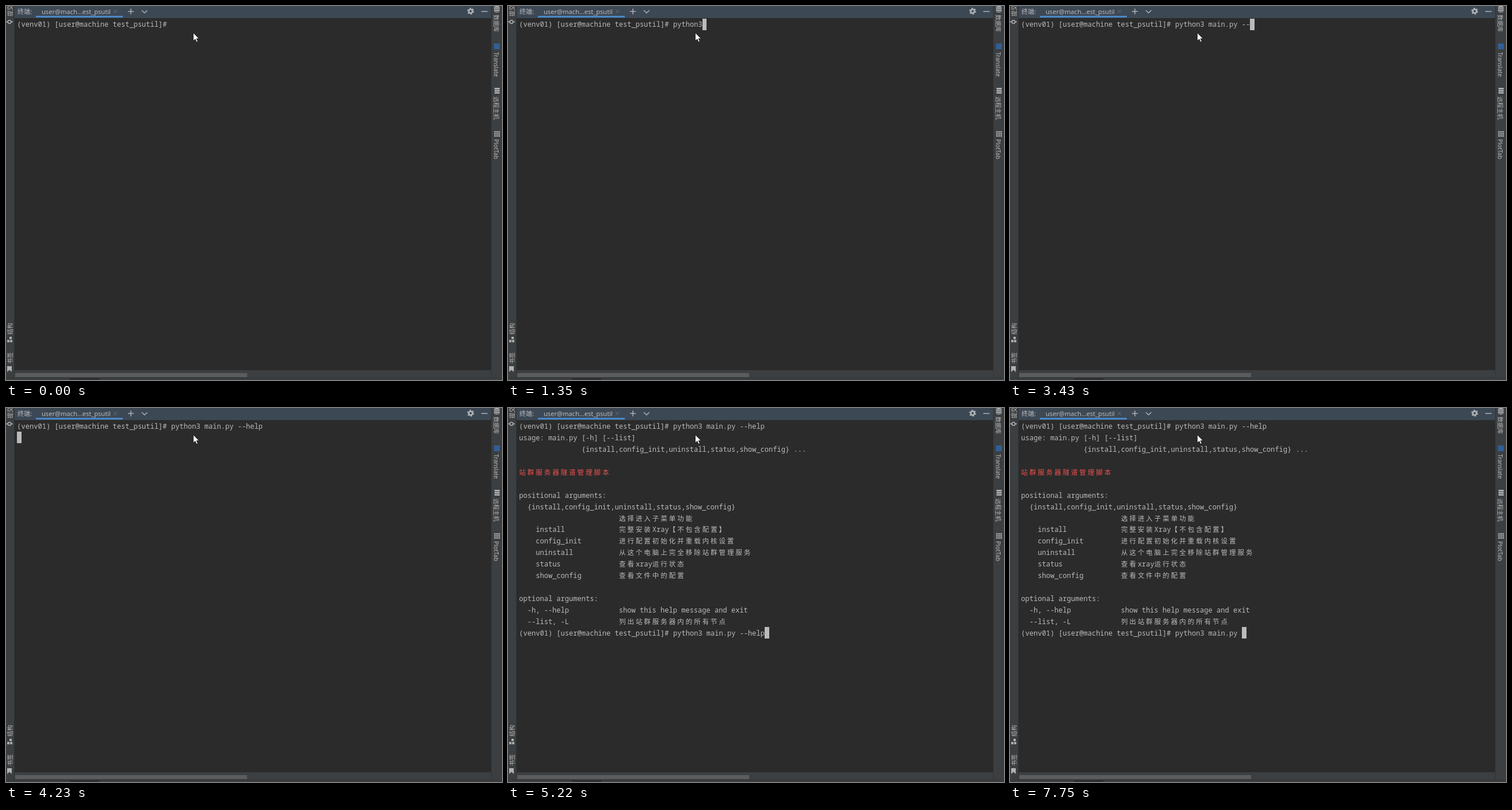
An HTML page that plays this animation: 862x649 px, repeating every 8 s.

```html
<!DOCTYPE html>
<html lang="zh-CN">
<head>
<meta charset="utf-8">
<title>Terminal</title>
<style>
  html, body { margin: 0; width: 100%; height: 100%; overflow: hidden; background: #2b2b2b; }
  svg { display: block; width: 862px; height: 649px; }
  text { fill: #bbb; white-space: pre; }
  .ui { font: 11.1px "Noto Sans", "Noto Sans CJK SC", "Noto Sans CJK", sans-serif; }
  .side { font: 10px "Noto Sans", "Noto Sans CJK SC", "Noto Sans CJK", sans-serif; dominant-baseline: central; }
  .mono { font: 12.06px "Noto Sans Mono", "DejaVu Sans Mono", monospace; font-variant-ligatures: none; }
  .cjk { font: 11.5px "Noto Sans CJK SC", "Noto Sans CJK", sans-serif; letter-spacing: 2.97px; }
  .red text { fill: #f0524f; }
  .line { fill: none; stroke: #afb1b3; stroke-width: 1.5; }
  .solid { fill: #afb1b3; }
  rect { shape-rendering: crispEdges; }
</style>
</head>
<body>
<svg viewBox="0 0 862 649" xmlns="http://www.w3.org/2000/svg">
  <rect width="862" height="649" fill="#3c3f41"/>
  <rect x="15" width="828" height="632" fill="#2b2b2b"/>
  <rect x="15" width="828" height="21" fill="#3d4855"/>
  <rect x="14" width="1" height="645" fill="#323435"/>
  <rect x="843" width="1" height="645" fill="#323435"/>

  <!-- header -->
  <text class="ui" x="20" y="13.5">终端:</text>
  <text class="ui" x="62" y="13.5">user@mach...est_psutil</text>
  <rect x="52" y="17" width="151" height="3" fill="#4a88c7"/>
  <path class="line" d="M187 6.5l6 6m0-6l-6 6" style="stroke:#66727d;stroke-width:1"/>
  <path class="line" d="M212 9.5h10M217 4.5v10M236 7.5l4.8 4.5 4.8-4.5M826 9.5h11"/>
  <circle class="line" cx="807.5" cy="9" r="3.2" style="stroke-width:2.6"/>
  <circle class="line" cx="807.5" cy="9" r="5" style="stroke-width:2;stroke-dasharray:2.6 2.636"/>

  <!-- bottom bars -->
  <rect x="16" y="637" width="403" height="7" fill="#5b5c5d"/>
  <rect y="645" width="862" height="1" fill="#303233"/>
  <rect x="111" y="646" width="51" height="3" fill="#2d2f30"/>

  <!-- left strip -->
  <path class="line" d="M0 27.5h3m6 0h3"/>
  <circle class="line" cx="6" cy="27.5" r="2.8"/>
  <path class="solid" d="M6 574h4v4h-4zM2 579.5h4v4h-4zM7 579.5h4v4h-4zM2 625h8v10l-4-3.5-4 3.5z"/>

  <!-- right strip -->
  <path class="solid" d="M848 1.5q5-3 10 0v1.5h-10zM848 4h10v2h-10zM848 7h10v2h-10zM848 10h10q-5 2.5-10 0z"/>
  <rect x="848" y="65" width="10" height="10" fill="#315f94"/>
  <path class="solid" d="M849 142h9v2.7h-9zM849 145.7h9v2.7h-9zM849 149.4h9v2.7h-9z"/>
  <path d="M848.5 218.5h10m-10 3.5h10m-10 3.5h10" stroke="#afb1b3" stroke-width="2.4" stroke-dasharray="2.6 1"/>

  <g id="labels"></g>
  <g id="prompt"></g>
  <g id="output"></g>
  <rect id="caret" height="20" fill="#bbb"/>
  <path d="M325.5 46.5v14l3.3-3 2.3 5 2.3-1-2.2-4.8h4.3z" fill="#fff" stroke="#111" stroke-width=".8"/>
</svg>
<script>
const CELL = 7.236, ROW = 19.92, LEFT = 19.29, TOP = 22, LOOP = 8000;
const PROMPT = "(venv01) [user@machine test_psutil]# ";
const COMMAND = "python3 main.py --help";
const ACTIONS = "{install,config_init,uninstall,status,show_config}";
const LAST_ROW = 18, ENTER = 4230, PRINTED = 4360;

const byId = id => document.getElementById(id);
const entry = (name, note) => ("    " + name).padEnd(24) + note;
const columnX = column => LEFT + column * CELL;
const baseline = row => Math.round(TOP + row * ROW + 14.2);

function addText(parent, className, content, attributes) {
  const node = document.createElementNS("http://www.w3.org/2000/svg", "text");
  node.setAttribute("class", className);
  for (const key in attributes) node.setAttribute(key, attributes[key]);
  node.textContent = content;
  parent.appendChild(node);
  return node;
}

// Wide characters take two cells each.
function addLine(parent, line, row) {
  let column = 0;
  for (const run of line.match(/[\u3000-\u9fff]+|[^\u3000-\u9fff]+/g) || []) {
    const wide = run[0] >= "\u3000";
    const content = run.trimStart();
    const indent = run.length - content.length;
    addText(parent, wide ? "cjk" : "mono", content, { x: columnX(column + indent), y: baseline(row) });
    column += run.length * (wide ? 2 : 1);
  }
}

const sideLabel = (content, x, y, angle) =>
  addText(byId("labels"), "side", content, { transform: `translate(${x} ${y}) rotate(${angle})` });

sideLabel("提交", 6.5, 18, -90);
sideLabel("结构", 6.5, 570, -90);
sideLabel("书签", 6.5, 621, -90);
sideLabel("数据库", 852, 15, 90);
sideLabel("Translate", 852, 80, 90);
sideLabel("远程主机", 852, 157, 90);
sideLabel("PlotTab", 852, 231, 90);

const help = [
  "usage: main.py [-h] [--list]",
  " ".repeat(15) + ACTIONS + " ...",
  "",
  "站群服务器隧道管理脚本",
  "",
  "positional arguments:",
  "  " + ACTIONS,
  entry("", "选择进入子菜单功能"),
  entry("install", "完整安装Xray【不包含配置】"),
  entry("config_init", "进行配置初始化并重载内核设置"),
  entry("uninstall", "从这个电脑上完全移除站群管理服务"),
  entry("status", "查看xray运行状态"),
  entry("show_config", "查看文件中的配置"),
  "",
  "optional arguments:",
  "  -h, --help".padEnd(24) + "show this help message and exit",
  "  --list, -L".padEnd(24) + "列出站群服务器内的所有节点",
  PROMPT
];
const output = byId("output");
help.forEach((line, i) => {
  const group = output.appendChild(document.createElementNS(output.namespaceURI, "g"));
  if (line.startsWith("站群")) group.setAttribute("class", "red");
  addLine(group, line, i + 1);
});
addLine(byId("prompt"), PROMPT, 0);

const commandAt = (parent, row) =>
  addText(parent, "mono", "", { x: columnX(PROMPT.length), y: baseline(row) });
const firstCommand = commandAt(byId("prompt"), 0);
const secondCommand = commandAt(output, LAST_ROW);

// [time, number of command characters present]
const firstKeys = [
  [0, 0], [70, 1], [340, 2], [540, 3], [610, 4], [680, 5], [880, 6], [1280, 7],
  [1680, 8], [1880, 9], [2010, 10], [2080, 11], [2210, 12], [2360, 16],
  [3300, 17], [3430, 18], [3630, 19], [3760, 20], [3830, 21], [3960, 22]
];
const secondKeys = [
  [0, 0], [5220, 22], [6010, 21], [6560, 20], [6690, 19], [6890, 18],
  [7020, 17], [7160, 16], [7420, 15], [7750, 16]
];
const caretOff = [[0, 70], [2830, 3300], [5680, 6010]];
const lengthAt = (keys, time) => keys.filter(([start]) => start <= time).pop()[1];

const caret = byId("caret");
function render(time) {
  const printed = time >= PRINTED;
  const first = lengthAt(firstKeys, time), second = lengthAt(secondKeys, time);
  firstCommand.textContent = COMMAND.slice(0, first);
  secondCommand.textContent = COMMAND.slice(0, second);
  output.style.display = printed ? "" : "none";

  const row = printed ? LAST_ROW : time >= ENTER ? 1 : 0;
  const column = row === 1 ? 0 : PROMPT.length + (printed ? second : first);
  const left = Math.round(columnX(column));
  caret.setAttribute("x", left);
  caret.setAttribute("width", Math.ceil(columnX(column + 1)) - left);
  caret.setAttribute("y", Math.floor(TOP + row * ROW));
  caret.style.display = caretOff.some(([from, to]) => time >= from && time < to) ? "none" : "";
}

const begin = performance.now();
function tick() {
  render((performance.now() - begin) % LOOP);
  requestAnimationFrame(tick);
}
tick();
</script>
</body>
</html>
```
